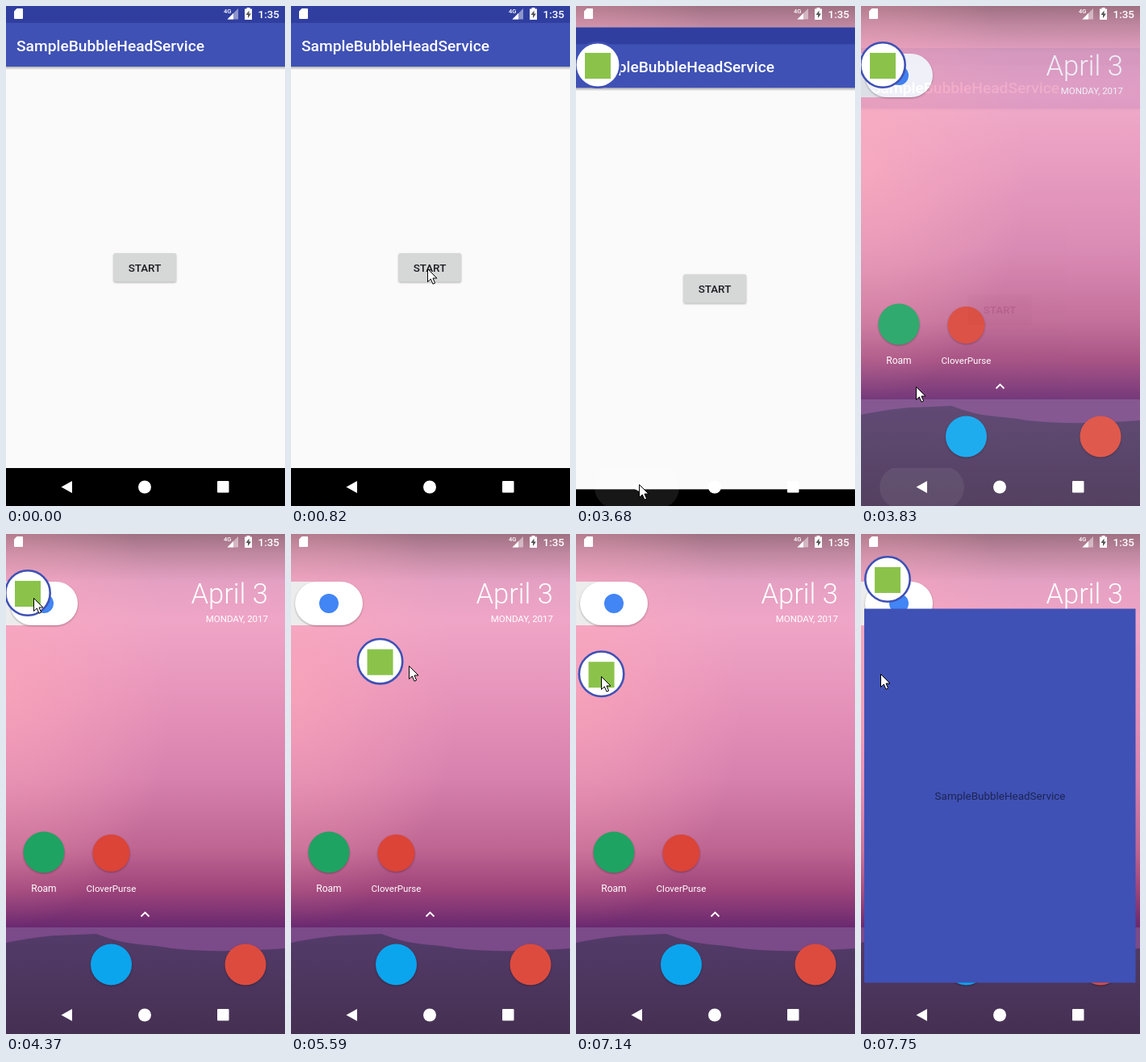
Recreate the animation shown at these times as an HTML page. Size 346 px wide and 619 px high, loop 8 s.

```html
<!DOCTYPE html>
<html lang="en">
<head>
<meta charset="utf-8">
<title>Bubble head demo</title>
<style>
html, body { margin: 0; height: 100%; overflow: hidden; background: #000; }
svg { display: block; width: 100vw; height: 100vh; font-family: Roboto, sans-serif; }
.mid { text-anchor: middle; }
.end { text-anchor: end; }
.medium { font-weight: 500; }
.lift { filter: drop-shadow(0 1px 1px rgba(0, 0, 0, .3)); }
</style>
</head>
<body>
<svg viewBox="0 0 346 619">
  <defs>
    <linearGradient id="sky" x2="0" y2="1">
      <stop offset="0" stop-color="#9f7082"/>
      <stop offset=".05" stop-color="#c088a1"/>
      <stop offset=".12" stop-color="#e4a0c2"/>
      <stop offset=".22" stop-color="#efa5c7"/>
      <stop offset=".42" stop-color="#e693ba"/>
      <stop offset=".62" stop-color="#d781ae"/>
      <stop offset=".8" stop-color="#be6592"/>
      <stop offset=".9" stop-color="#a0457b"/>
      <stop offset="1" stop-color="#68286f"/>
    </linearGradient>
    <radialGradient id="glow" cx="0" cy=".4" r=".6">
      <stop offset="0" stop-color="#ffa9ba" stop-opacity=".65"/>
      <stop offset="1" stop-color="#ffa9ba" stop-opacity="0"/>
    </radialGradient>
    <linearGradient id="hill" x2="0" y2="1">
      <stop offset="0" stop-color="#533b69"/>
      <stop offset="1" stop-color="#453052"/>
    </linearGradient>
    <linearGradient id="shade" x2="0" y2="1">
      <stop offset="0" stop-opacity=".3"/>
      <stop offset="1" stop-opacity="0"/>
    </linearGradient>
    <clipPath id="navClip"><rect y="572" width="346" height="47"/></clipPath>
  </defs>

  <g id="home">
    <rect width="346" height="488" fill="url(#sky)"/>
    <rect width="346" height="488" fill="url(#glow)"/>
    <rect y="487" width="346" height="132" fill="#7b4a89"/>
    <path d="M0 506Q40 498 65 497T112 495Q140 506 165 508T205 513Q240 517 280 516T346 513V619H0Z" fill="url(#hill)"/>
    <rect y="59" width="50" height="54" fill="#ececec"/>
    <rect class="lift" x="5" y="59" width="84" height="54" rx="27" fill="#fff"/>
    <circle cx="47" cy="86" r="12" fill="#4285f4"/>
    <g fill="#fff">
      <text class="end" x="325" y="86" font-size="34.6" font-weight="300">April 3</text>
      <text class="end" x="325" y="108.5" font-size="11.5">MONDAY, 2017</text>
      <text class="mid" x="47" y="443" font-size="12">Roam</text>
      <text class="mid" x="130.5" y="443" font-size="11.5">CloverPurse</text>
    </g>
    <path d="M167.5 473.5l5-5 5 5" fill="none" stroke="#fff" stroke-width="1.8"/>
    <g class="lift">
      <circle cx="47" cy="394" r="25.5" fill="#1ea362"/>
      <circle cx="130.5" cy="395" r="23" fill="#db4437"/>
      <circle cx="130.5" cy="533" r="25.5" fill="#0ba5ee"/>
      <circle cx="297" cy="533" r="25.5" fill="#dd4b3e"/>
    </g>
  </g>

  <g id="app">
    <rect width="346" height="619" fill="#fafafa"/>
    <rect width="346" height="22" fill="#303f9f"/>
    <rect y="21" width="346" height="54" fill="#3f51b5"/>
    <rect y="75" width="346" height="4" fill="url(#shade)"/>
    <text class="medium" x="13" y="55.5" font-size="19.2" fill="#fff">SampleBubbleHeadService</text>
    <g class="lift">
      <rect x="133.5" y="306" width="77.5" height="35.5" rx="2" fill="#d6d7d7"/>
      <rect id="press" x="133.5" y="306" width="77.5" height="35.5" rx="2"/>
    </g>
    <text class="mid medium" x="172" y="329" font-size="13.46" fill="#1c1c22">START</text>
    <rect y="572" width="346" height="47"/>
  </g>

  <g fill="#fff">
    <path d="M13.5 3H20q1 0 1 1v11q0 1-1 1h-9q-1 0-1-1V6.5Z"/>
    <text class="medium" x="270" y="8.5" font-size="7.5">4G</text>
    <path d="M288 3V16.5H274.5Z" opacity=".45"/>
    <path d="M282 9V16.5H274.5Z"/>
    <path d="M298.5 2h4v1.5h2.500V17h-9V3.500h2.500Z"/>
    <path d="M301.5 5.5l-4 5.5h2.5v4l4-5.5h-2.5Z" fill="#555"/>
    <text class="medium end" x="339" y="14.5" font-size="13.46">1:35</text>
    <g clip-path="url(#navClip)">
      <rect id="ripple" x="23" y="570" width="105" height="52" rx="26" fill-opacity=".09"/>
    </g>
    <path d="M68.5 595.5L82 588V603Z"/>
    <circle cx="172" cy="595.5" r="8"/>
    <rect x="262" y="588" width="14.5" height="14.5" rx="1"/>
  </g>

  <g id="panel">
    <rect x="4" y="92.5" width="336.500" height="463" fill="#3f51b5"/>
    <text class="mid" x="172.5" y="329" font-size="13.46" fill="#1d2553">SampleBubbleHeadService</text>
  </g>
  <g id="bubble">
    <circle r="27.7" fill="#fff" stroke="#3f51b5" stroke-width="2.6"/>
    <rect x="-16" y="-15" width="32" height="32" fill="#8bc34a"/>
  </g>
  <path id="cursor" d="M.5.5V16.500L4.300 13 7 19.200 9.600 18 7 12H12Z" fill="#fff" stroke="#000"/>
</svg>

<script>
const LOOP = 8000;
const STEP = 1000 / 13, PHASE = 48; // the screen refreshes 13 times a second

const linear = u => u;
const easeIn = u => u ** 3;
const easeOut = u => 1 - (1 - u) ** 2;

// Each pointer move: start and end time, destination, easing.
const moves = [
  [160, 810, 169, 325, linear],    // to START
  [1900, 2370, 26, 84, easeOut],   // to the bubble
  [2440, 3210, 78, 592, linear],   // to Back
  [3740, 4355, 34, 79, easeOut],   // grab the bubble
  [4400, 5050, 34, 187, linear],   // drag down
  [5280, 5355, 60, 165, linear],   // drag right
  [5355, 5586, 146, 163, linear],
  [5586, 5820, 325, 174, linear],
  [6255, 6685, 115, 212, easeIn],  // drag left
  [6685, 7290, 24, 173, easeOut]
];

const ramp = (t, from, to) => Math.min(1, Math.max(0, (t - from) / (to - from)));

function cursorAt(t) {
  let x = 243, y = 575;
  for (const [from, to, endX, endY, ease] of moves) {
    const u = ease(ramp(t, from, to));
    x += (endX - x) * u;
    y += (endY - y) * u;
  }
  return [x, y];
}

// While dragged, the bubble trails the pointer by one refresh.
function bubbleAt(t, open) {
  if (open) return [33, 56];
  if (t < 4400) return [27, 73];
  const [x, y] = cursorAt(t - STEP);
  return [Math.max(27, x - 7), y - 6];
}

const $ = id => document.getElementById(id);
const move = (id, x, y) => $(id).setAttribute("transform", `translate(${x} ${y})`);
const fade = (id, opacity) => $(id).setAttribute("opacity", +opacity);

function draw(time) {
  const t = Math.floor((time - PHASE) / STEP) * STEP + PHASE;
  const open = time >= 7750;
  move("cursor", ...cursorAt(t).map(Math.round));
  move("bubble", ...bubbleAt(t, open));
  move("app", 0, 52 * ramp(t, 3590, 3735));
  fade("app", 1 - ramp(t, 3670, 3830));
  fade("press", .12 * (ramp(t, 1560, 1660) - ramp(t, 1740, 1820)));
  fade("ripple", ramp(t, 3400, 3600) - ramp(t, 3760, 4000));
  fade("cursor", time >= 210);
  fade("bubble", time >= 1750);
  fade("panel", open);
}

const begin = performance.now();
function frame() {
  draw((performance.now() - begin) % LOOP);
  requestAnimationFrame(frame);
}
frame();
</script>
</body>
</html>
```
